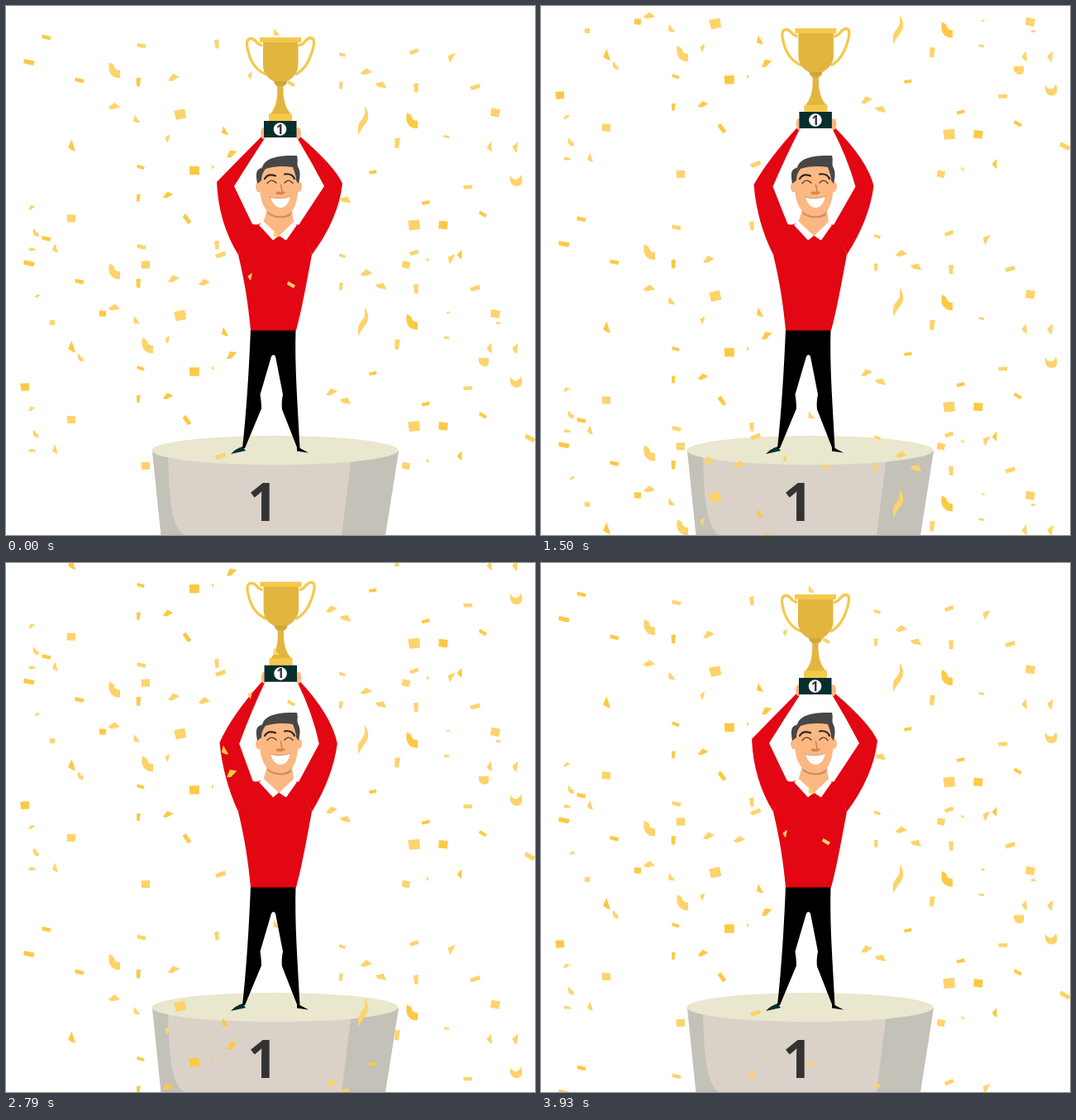
Animation, 640 px wide and 640 px high, one loop 4 s. Source, as an HTML page with a canvas:

```html
<!DOCTYPE html>
<html lang="en">
<head>
<meta charset="utf-8">
<title>Winner</title>
<style>
html, body { margin: 0; width: 100%; height: 100%; overflow: hidden; background: #fff; }
canvas { display: block; width: 640px; height: 640px; }
</style>
</head>
<body>
<canvas id="stage" width="640" height="640"></canvas>
<script>
const ctx = document.getElementById('stage').getContext('2d');

const LOOP = 4000, HOLDS = 56, STEPS = 99, FALL = 573, LAYER_GAP = 243.4;
const LIGHT = '#fed36b', DARK = '#fdc944';
const RED = '#e30613', SKIN = '#fcb883', GREEN = '#052f2c', GOLD = '#e2b53f', BRIGHT = '#f4c94c';

// Confetti outlines, centred on the origin
const slab = 'M-5.5-3L5.5-1.5L4.5 3L-5.5 1.5Z';
const chip = 'M-2.5-5L3-5.5L2 5.5L-2 5Z';
const flake = 'M-7 3L-1-5L7-1.5L-2 4Z';
const shard = 'M-4 1L.5-8.5L5 6L0 4Z';
const tile = 'M-5.5-5L5.5-4.5L5 5L-5.5 4.5Z';
const curl = 'M-6-9L-1-6C1-3-1 0 7 1V10C-2 11-9 4-6-9Z';
const ribbon = 'M2-17C8-8 8 0 0 8L-6 18V8C-6 2 2-2 2-9Z';
const cup = 'M-7-6C-3 1 3 1 6-7C9 2 7 7 1 7C-5 7-8 2-7-6Z';

// Each piece: x, y, degrees, size
const shared = [
  [LIGHT, slab, [[164, 48, 4], [407, 59, 10, .75], [494, 55, -28], [345, 94, 22, .9],
    [568, 98, -25, 1.1], [533, 158, 3, .6], [559, 219, -10], [260, 301, -28, 1.15]]],
  [DARK, slab, [[49, 38, 4], [28, 68, 4, 1.2], [89, 90, 4], [163, 195, 10, .85],
    [444, 201, -18, .85], [508, 238, -22, .9], [577, 252, 23, .9], [219, 258, 46, 1.1]]],
  [LIGHT, chip, [[255, 46, -6], [405, 96, 4, .85], [496, 99, -3, 1.05], [473, 166, 5, 1.15]]],
  [DARK, chip, [[160, 92], [160, 232, 3, .85], [250, 195, 0, .35]]],
  [LIGHT, flake, [[203, 87], [436, 80, 12], [454, 96, 42], [131, 122, 18], [394, 224],
    [411, 235, 42], [31, 244, -8, .6]]],
  [DARK, flake, [[196, 229, 3, .9], [273, 179, -14]]],
  [LIGHT, shard, [[326, 33, -22, .75], [538, 62, 45, .9], [295, 84, 28, .65], [157, 138, -22, .8],
    [195, 160, 32, .7], [585, 171, 12, .85], [616, 171, 25, .9], [59, 294, 0, .8], [510, 307, -20, .4]]],
  [DARK, shard, [[79, 170], [264, 152, -12, .85], [549, 301, 18, .8]]],
  [LIGHT, tile, [[592, 129, 8], [211, 131, -14, 1.2], [79, 257, 0, .95], [494, 265, -8, 1.25],
    [169, 313, -4, .95], [484, 313, 10, .85]]],
  [DARK, tile, [[228, 199, -3, 1.1], [529, 265, 3]]],
  [LIGHT, curl, [[131, 77], [36, 274, 0, .5], [32, 295, 130, .4]]],
  [DARK, curl, [[491, 138]]],
  [LIGHT, ribbon, [[432, 138]]],
  [LIGHT, cup, [[617, 211]]]
];
const extras = [
  [LIGHT, flake, [[240, 335, 10], [38, 351, 0, .5], [535, 371, 0, .35]]],
  [DARK, tile, [[117, 372, 0, .75], [23, 461, -6, .95]]],
  [LIGHT, tile, [[56, 383, 4, .6]]],
  [LIGHT, curl, [[171, 410], [90, 425, 0, .5], [596, 384, 130, .3]]],
  [LIGHT, cup, [[578, 430, 0, .85]]],
  [LIGHT, tile, [[578, 430, 0, .85]]],
  [LIGHT, slab, [[634, 523, 22, 1.2]]]
];

function addPieces(layer, groups, dy) {
  for (const [color, outline, pieces] of groups) {
    const shape = new Path2D(outline);
    for (const [x, y, deg = 0, size = 1] of pieces) {
      layer[color].addPath(shape, new DOMMatrix().translate(x, y + dy).rotate(deg).scale(size));
    }
  }
}
const newLayer = () => ({ [LIGHT]: new Path2D(), [DARK]: new Path2D() });
const backLayer = newLayer(), frontLayer = newLayer();
addPieces(backLayer, shared, 0);
addPieces(frontLayer, shared, LAYER_GAP);
addPieces(frontLayer, extras, 0);

function fill(color, d) {
  ctx.fillStyle = color;
  ctx.fill(new Path2D(d));
}
function stroke(color, width, d) {
  ctx.strokeStyle = color;
  ctx.lineWidth = width;
  ctx.stroke(new Path2D(d));
}
function oval(color, x, y, rx, ry) {
  ctx.fillStyle = color;
  ctx.beginPath();
  ctx.ellipse(x, y, rx, ry, 0, 0, Math.PI * 2);
  ctx.fill();
}
function numeral(x, y, size) {
  ctx.fillStyle = '#333';
  ctx.font = `700 ${size}px "Open Sans", sans-serif`;
  ctx.fillText('1', x, y);
}

function drawConfetti(layer, offset) {
  for (const dy of [offset - FALL, offset]) {
    ctx.save();
    ctx.translate(0, dy);
    for (const color in layer) {
      ctx.fillStyle = color;
      ctx.fill(layer[color]);
    }
    ctx.restore();
  }
}

function drawPodium() {
  fill('#dad2c9', 'M177 538L187.5 640H459L475 538Z');
  fill('#c4c1b9', 'M177 538L187.5 640H215C199 628 197 590 196 540Z');
  fill('#c4c1b9', 'M418 545L406 640H459L475 538Z');
  oval('#e9e7ce', 325.5, 537.5, 149, 17.7);
  numeral(292.3, 623, 64);
}

// Wrist, outer bend, elbow, outer bend, armpit, shoulder, inner elbow, inner bend, inner wrist
const arms = [
  { low: [309, 158, 282, 185, 255, 213, 257, 262, 281, 301, 298, 264, 276, 218, 294, 189, 313, 160],
    high: [310, 137, 269, 184, 260, 219, 265, 260, 281, 301, 299, 264, 285, 219, 296, 180, 313, 138] },
  { low: [356, 158, 398, 194, 407, 215, 402, 258, 370, 301, 354, 265, 385, 218, 370, 189, 353, 161],
    high: [356, 137, 392, 180, 398, 220, 393, 258, 370, 301, 354, 265, 376, 219, 372, 180, 353, 138] }
];
function drawArm({ low, high }, lift) {
  const v = low.map((n, i) => n + (high[i] - n) * lift);
  ctx.fillStyle = RED;
  ctx.beginPath();
  ctx.moveTo(v[0], v[1]);
  ctx.quadraticCurveTo(v[2], v[3], v[4], v[5]);
  ctx.quadraticCurveTo(v[6], v[7], v[8], v[9]);
  ctx.lineTo(v[10], v[11]);
  ctx.lineTo(v[12], v[13]);
  ctx.quadraticCurveTo(v[14], v[15], v[16], v[17]);
  ctx.fill();
}

function drawBody(lift) {
  fill(GREEN, 'M286 533L290 538L272 542Q277 536 286 533Z');
  fill('#000', 'M352 533L366 540.5L352 538.5Z');
  fill('#000', 'M296 391H350.5C349 435 353 485 355.5 535L352 534L334 488Q333 480 335 470L326 424Q323.5 420 321 424L307.5 470Q309 480 309 487L289 535H286C291 490 294 440 296 391Z');
  arms.forEach(arm => drawArm(arm, lift));
  fill(RED, 'M281 301L297 263Q302 266 308 263L323 282L330 277L338 283L350 264L355 265L370 301C363 338 358 367 351 392.5H296C293 360 289 335 281 301Z');
  fill(SKIN, 'M316 246L346 246L348 262L330.5 278L311 263Z');
  fill('#fff', 'M306 265L312 261L330 278L323 283.5Z');
  fill('#fff', 'M330.5 278L347 262L352 265L339 283.5Z');
}

function drawHead() {
  fill('#cc9167', 'M316 248Q331 255 346 247L344 254Q331 260 317 252Z');
  oval(SKIN, 306, 219, 4, 6.5);
  oval(SKIN, 354, 218.5, 4, 6.5);
  fill(SKIN, 'M308 195C306 215 306 233 313 244C321 257 341 258 348 245C355 232 354 212 353 194Q330 186 308 195Z');
  fill('#474747', 'M304 215C302 203 302 197 310 196C312 185 326 180 352 181C354 188 351 191 354 196C357 203 355 210 354 215L351 211C351 205 349 201 347 195C335 193 323 194 314 197Q309 203 309 211Z');
  ctx.lineCap = 'round';
  stroke('#282828', 2.2, 'M313 209Q317 202 326 205.5M337 203.5Q346 202 349 209');
  stroke('#5e3b27', 1.4, 'M316 214.5Q321 208 327 214M337 214Q342 208 347 214.5');
  stroke('#cf7e45', 1.5, 'M332.5 216L334 225');
  ctx.lineCap = 'butt';
  fill('#d9864b', 'M326 227Q328 223 332 225Q337 223 338 226Q333 230 326 227Z');
  fill('#fff', 'M320 231Q332 235 344 230C342 239 338 244 332 244C326 244 322 238 320 231Z');
  stroke('#d1845a', .8, 'M319 231Q332 235 344.5 230');
}

function drawTrophy(lift) {
  ctx.save();
  ctx.translate(lift * .8, -22 * lift);
  oval(SKIN, 311.5, 154, 3.3, 7);
  oval(SKIN, 353.5, 154, 3.5, 7);
  stroke(BRIGHT, 3.3, 'M310 47.5C302 47 303 39 296 39.5C290 40 291 48 293 55C296 68 303 78 315 83');
  stroke(BRIGHT, 3.3, 'M354 47.5C363 47 361 38.5 369 38.5C375 39 372 50 370 56C366 69 360 78 350 83');
  fill(GOLD, 'M311 43H353.5V72C353 83 344 89 339 91.5H325C319 89 311 83 311 72Z');
  fill(BRIGHT, 'M307 38H357V44H307Z');
  fill(GOLD, 'M328 95H335.5C335 112 337 123 346 132H319C327 122 329 112 328 95Z');
  fill('#d2a637', 'M324 91H340Q339 97 334 97H329Q325 96 324 91Z');
  fill(BRIGHT, 'M318 130.5H346V139H318Z');
  fill(GREEN, 'M312 139H351.5V159H312Z');
  oval('#fff', 331.5, 149, 7.8, 7.8);
  numeral(327, 154.5, 15.5);
  ctx.restore();
}

// Centre, peak step and radius of each glint
const glints = [[302, 29, 15, 5], [339, 109, 29, 8], [355, 38, 47, 5]];
function drawGlints(step) {
  for (const [x, y, peak, radius] of glints) {
    const r = radius * Math.max(0, 1 - Math.abs(step - peak) / 6), k = r * .2;
    if (!r) continue;
    ctx.fillStyle = '#fffbe9';
    ctx.beginPath();
    for (let i = 0; i < 8; i++) {
      const a = i * Math.PI / 4, d = i % 2 ? k * 1.4 : r;
      ctx.lineTo(x + Math.cos(a) * d, y + Math.sin(a) * d);
    }
    ctx.fill();
  }
}

function liftAt(step) {
  const c = step % 50;
  return c <= 29 ? c / 29 : Math.max(0, (47 - c) / 18);
}

const start = performance.now();
function render() {
  const t = (performance.now() - start) % LOOP;
  const hold = Math.min(HOLDS - 1, Math.floor((t + 5) * HOLDS / LOOP));
  const step = Math.ceil(hold * 25 / 14 - 1e-6);
  const offset = step * FALL / STEPS, lift = liftAt(step);

  ctx.fillStyle = '#fff';
  ctx.fillRect(0, 0, 640, 640);
  drawPodium();
  drawConfetti(backLayer, offset);
  drawBody(lift);
  drawHead();
  drawTrophy(lift);
  drawGlints(step);
  drawConfetti(frontLayer, offset);
  requestAnimationFrame(render);
}
render();
</script>
</body>
</html>
```
